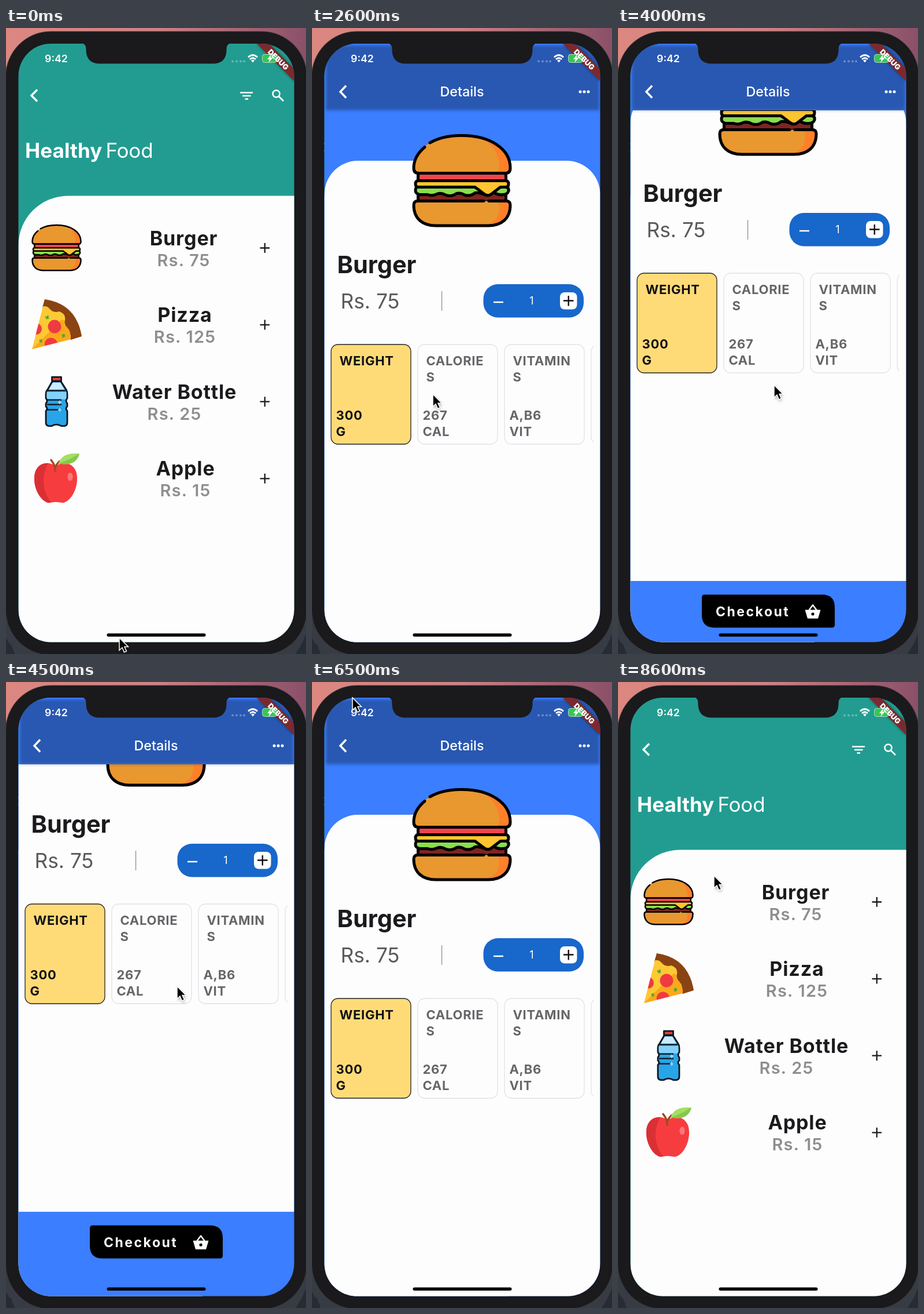
These frames come from a looping animation (519 px wide and 1080 px high, 8700 ms). An HTML page:

```html
<!DOCTYPE html>
<html lang="en">
<head>
<meta charset="utf-8">
<title>Food ordering app</title>
<style>
  html, body { margin: 0; width: 100%; height: 100%; overflow: hidden; background: #1a191c; }
  svg { display: block; width: 519px; height: 1080px; font-family: Inter, sans-serif; }
  .name { font-size: 34px; font-weight: 700; letter-spacing: .9px; fill: #1b1b1d; text-anchor: middle; }
  .price { font-size: 29px; font-weight: 600; letter-spacing: 1.2px; fill: #8e8e90; text-anchor: middle; }
  .card { font-size: 22px; font-weight: 700; letter-spacing: .7px; }
  .line { fill: none; stroke-linecap: round; stroke-linejoin: round; }
</style>
</head>
<body>
<svg viewBox="0 0 519 1080">
  <defs>
    <linearGradient id="sky"><stop offset="0" stop-color="#dc8780"/><stop offset=".5" stop-color="#cf8285"/><stop offset="1" stop-color="#8a5068"/></linearGradient>
    <clipPath id="screen"><rect x="21.500" y="27" width="477" height="1032.500" rx="56"/></clipPath>
    <clipPath id="body"><rect x="21" y="142" width="478" height="920"/></clipPath>
    <clipPath id="strip"><rect x="32" y="500" width="455" height="300"/></clipPath>
    <clipPath id="slice"><path d="M1 86 23 0Q78 8 87 64Z"/></clipPath>
    <clipPath id="fruit"><path id="fruitShape" d="M42 24C34 13 6 14 5 42C4 63 17 84 30 86Q42 83 54 86C68 84 80 62 79 42C78 14 50 13 42 24Z"/></clipPath>
    <filter id="soft" x="-10%" y="-20%" width="120%" height="140%"><feGaussianBlur stdDeviation="2.6"/></filter>

    <g id="burger">
      <g stroke="#000" stroke-width="5" stroke-linejoin="round" stroke-linecap="round">
        <path d="M3 59C3 26 38 3 86.500 3S170 26 170 59Q170 68 162 68H11Q3 68 3 59Z" fill="#e9972f" stroke="none"/>
        <path d="M119 7C150 15 170 32 170 59Q170 68 162 68H143Q151 66 151 55C150 34 140 18 119 7Z" fill="#ff8029" stroke="none"/>
        <path d="M31 15.500C46 7 65 3 86.500 3C135 3 170 26 170 59Q170 68 162 68H11Q3 68 3 59C3 45 10 33 22 23" fill="none"/>
        <rect x="10.500" y="68" width="152" height="13" fill="#f4434c"/>
        <rect x="10.500" y="100" width="152" height="17" fill="#7d2521"/>
        <path d="M10 92H163Q168 93 167 99Q165 105 157 105Q148 106 142 101Q135 106 126 105Q117 101 109 102Q102 108 92 106Q84 101 77 103Q69 109 59 106Q51 101 43 104Q35 108 27 105L13 105Q6 103 6 98Q6 92 10 92Z" fill="#8ade4c"/>
        <path d="M11 81H162Q167 81 167 86.500T162 92H153L136 105Q130 108 125 104L109 92H11Q6 92 6 86.500T11 81Z" fill="#ffc52e"/>
        <path d="M10 116H163Q170 116 170 123C170 147 154 158.500 132 158.500H41C19 158.500 3 147 3 123Q3 116 10 116Z" fill="#e9972f" stroke="none"/>
        <path d="M146 116H163Q170 116 170 123C170 147 154 158.500 132 158.500H118C139 157 151 146 151 127Q151 119 146 116Z" fill="#ff8029" stroke="none"/>
        <path d="M133 116H163Q170 116 170 123C170 147 154 158.500 132 158.500H41C19 158.500 3 147 3 123Q3 116 10 116H124" fill="none"/>
      </g>
    </g>

    <g id="pizza">
      <path d="M23 0Q78 8 87 64L68 70 19 14Z" fill="#8a4312"/>
      <path d="M1 86 20 12Q28 11 32 17Q38 24 48 21Q60 25 58 36Q56 43 62 49Q68 55 68 69Z" fill="#fdc935"/>
      <path d="M1 86 52 35Q58 35 57 41Q56 44 62 49Q68 55 68 69Z" fill="#fba81b"/>
      <g fill="#f03a42" clip-path="url(#slice)"><circle cx="40" cy="47" r="11.500"/><circle cx="8" cy="51" r="10"/><path d="M23 80.500A11 11 0 0 1 45 75Z"/></g>
      <path d="M24 30l6 3M29 28l-3 6M53 61l5 3M57 60l-3 6M14 70l4 4M18 69l-3 5" stroke="#4aa832" stroke-width="2.500"/>
    </g>

    <g id="bottle" stroke="#10151c" stroke-width="2.800" stroke-linejoin="round">
      <path d="M36 9H51L60 23Q62 26 62 31V38Q58 43 62 47V52Q58 56 62 60V80Q62 85 57 86H52Q43 81 35 86H30Q25 85 25 80V60Q29 56 25 52V47Q29 43 25 38V31Q25 26 28 23Z" fill="#28a4e8"/>
      <path d="M26.500 27H60.500V37L59 40H28L26.500 37Z" fill="#83d1fb" stroke="none"/>
      <path d="M28 25H59M27 41H52M27 49H52M27 58H52" stroke-width="2.300"/>
      <path d="M37 11H50L57 23H30Z" fill="#c9ecff" stroke="none"/>
      <path d="M46 45h6M49 42v6M46 58h6M49 55v6" stroke="#a5dcfb" stroke-width="2"/>
      <rect x="35.500" y="1.400" width="16" height="7" fill="#e83c35"/>
    </g>

    <g id="apple">
      <use href="#fruitShape" fill="#f73c3f"/>
      <path d="M0 10H34C16 34 16 66 38 90H0Z" fill="#da3035" clip-path="url(#fruit)"/>
      <path d="M41 31Q42 22 34 12M41 27Q42 20 49 14" class="line" stroke="#a34a20" stroke-width="3.500"/>
      <path d="M47 18Q53-2 83 1Q77 24 47 18Z" fill="#a4df61"/>
      <path d="M47 18Q63 13 83 1Q77 24 47 18Z" fill="#83c94b"/>
      <ellipse cx="67" cy="41" rx="4.500" ry="7" fill="#fa777b"/>
    </g>
  </defs>

  <rect width="519" height="1080" fill="url(#sky)"/>
  <rect y="900" width="519" height="180" fill="#363b44"/>
  <path d="M0 1052l5 9 4 3 6 16H0ZM519 1046l-8 18-10 16h18Z" fill="#272b33"/>
  <rect x="-.5" y="6" width="521" height="1076" rx="78" fill="#1a191c" stroke="#3b393d"/>

  <g clip-path="url(#screen)">
    <g id="list">
      <rect x="21" y="27" width="478" height="1034" fill="#229c91"/>
      <path d="M21.500 375A86 85.500 0 0 1 107.500 289.500H499V1061H21.500Z" fill="#fefdfe"/>
      <path d="M54 106.500 44 116.500 54 126.500" fill="none" stroke="#fff" stroke-width="3.500"/>
      <path d="M405 111.500H427M409 117H423.500M413.500 122.500H419" stroke="#fff" stroke-width="2.400"/>
      <g fill="none" stroke="#fff" stroke-width="2.500"><circle cx="467.500" cy="113.500" r="6"/><path d="M472 118 480 126"/></g>
      <g fill="#fff" font-size="35"><text x="33" y="224" font-weight="700" letter-spacing=".1">Healthy</text><text x="172.500" y="224" font-weight="400" letter-spacing="-.2">Food</text></g>
      <g id="rows"></g>
    </g>

    <g id="detail">
      <rect x="21" y="27" width="478" height="1034" fill="#3b7eff"/>
      <g clip-path="url(#body)"><g id="page">
        <path d="M21.500 287A58 58 0 0 1 79.500 229H440.500A58 58 0 0 1 498.500 287V1077H21.500Z" fill="#fefdfe"/>
        <use id="dish" href="#burger" x="173" y="182.500"/>
        <text x="43.500" y="422.500" font-size="41.500" font-weight="700" fill="#1b1b1d">Burger</text>
        <text x="49.500" y="483.500" font-size="35.300" fill="#5a5a5c">Rs. 75</text>
        <path d="M224.500 454V488" stroke="#9a9a9c" stroke-width="1.500"/>
        <rect x="296.500" y="442" width="173.500" height="57.500" rx="25" fill="#1867cb"/>
        <path d="M314 473H331" stroke="#fff" stroke-width="2.500"/>
        <text x="380" y="477" font-size="18" fill="#fff" text-anchor="middle">1</text>
        <rect x="429" y="456" width="29.500" height="29.500" rx="8" fill="#fff"/>
        <path d="M435 470.500H452.500M443.750 462V479.500" stroke="#111" stroke-width="2.400"/>
        <g id="cards" clip-path="url(#strip)"></g>
        <path d="M150 1100.500H353Q375 1100.500 375 1122.500V1152.500Q375 1157.500 370 1157.500H167Q145 1157.500 145 1135.500V1105.500Q145 1100.500 150 1100.500Z"/>
        <text x="169" y="1137.500" font-size="23" font-weight="700" letter-spacing="2.500" fill="#fff">Checkout</text>
        <path d="M324.500 1127.500H349.500L345.500 1141H328.500Z" fill="#fff" stroke="#fff" stroke-width="1.500" stroke-linejoin="round"/>
        <path d="M331 1126.500 337 1118.500 343 1126.500" class="line" stroke="#fff" stroke-width="2.400"/>
        <circle cx="337" cy="1134" r="2.600"/>
      </g></g>
      <rect x="24" y="30" width="473" height="112" opacity=".3" filter="url(#soft)"/>
      <path d="M59 99.500 49 110 59 120.500" fill="none" stroke="#fff" stroke-width="3.500"/>
      <text x="259.500" y="118" font-size="23.300" font-weight="500" fill="#fff" text-anchor="middle">Details</text>
      <g fill="#fff"><circle cx="464" cy="110" r="2.500"/><circle cx="471" cy="110" r="2.500"/><circle cx="478" cy="110" r="2.500"/></g>
    </g>

    <use id="hero" href="#burger"/>

    <path d="M434 27H455L499 71V92Z" opacity=".45" filter="url(#soft)"/>
    <path d="M434 27H455L499 71V92Z" fill="#7a2a2e"/>
    <g id="signal" fill="#fff" opacity=".3"></g>
    <path d="M419 50.500Q427 43 435 50.500M422 54Q427 49.500 432 54" fill="none" stroke="#fff" stroke-width="2.800"/>
    <path d="M424 56Q427 53.500 430 56L427 59.500Z" fill="#fff"/>
    <rect x="443.500" y="45.500" width="25" height="14" rx="4" fill="#35c84f" stroke="#b8d6ce"/>
    <path d="M459 45 452 54H456L454 60 462 51H457.500Z" fill="#fff"/>
    <text transform="translate(471 54.500) rotate(45)" y="4.500" font-size="12.800" font-weight="900" fill="#fff" text-anchor="middle">DEBUG</text>
    <text x="87" y="59" font-size="17.700" font-weight="600" fill="#fff" text-anchor="middle">9:42</text>
    <path d="M130 26Q138.500 27 138.500 36V38Q139 61.500 162 61.500H358Q381 61.500 381.500 38V36Q381.500 27 390 26Z" fill="#1a191c"/>
    <rect x="174.500" y="1044.500" width="171" height="5.500" rx="2.750"/>
  </g>

  <g id="cursor">
    <path d="M0 0V21.500L5 17 8.500 25 12.500 23.200 9 15.500H15.500Z" transform="translate(1 3)" opacity=".35" filter="url(#soft)"/>
    <path d="M0 0V21.500L5 17 8.500 25 12.500 23.200 9 15.500H15.500Z" stroke="#fff" stroke-width="1.500"/>
  </g>
</svg>
<script>
const $ = id => document.getElementById(id);
const LOOP = 8700, STEP = 100, WIDTH = 477;

const foods = [
  ['burger', 'Burger', 75, 307.5],
  ['pizza', 'Pizza', 125, 309.5],
  ['bottle', 'Water Bottle', 25, 291.5],
  ['apple', 'Apple', 15, 310.5]
];
$('rows').innerHTML = foods.map(([icon, name, price, x], i) => {
  const art = i ? `<use href="#${icon}" x="44" y="335.5"/>`
    : '<use id="thumb" href="#burger" transform="translate(44 338.5) scale(.503)"/>';
  return `<g transform="translate(0 ${i * 132.6})">${art}
    <text class="name" x="${x}" y="374.5">${name}</text>
    <text class="price" x="${x}" y="410.500">Rs. ${price}</text>
    <path d="M439.500 379.500H456M447.750 371V388" stroke="#1b1b1d" stroke-width="2.300"/></g>`;
}).join('');

const facts = [['WEIGHT', '', '300', 'G'], ['CALORIE', 'S', '267', 'CAL'], ['VITAMIN', 'S', 'A,B6', 'VIT'], ['', '', '', '']];
$('cards').innerHTML = facts.map(([a, b, c, d], i) => {
  const text = (x, y, s) => `<text class="card" x="${x}" y="${y}">${s}</text>`;
  return `<g transform="translate(${33 + i * 150} 546)" fill="${i ? '#666668' : '#111'}">
    <rect width="138" height="172" rx="12" fill="${i ? '#fefdfe' : '#ffdb78'}" stroke="${i ? '#e2e1e7' : '#222'}" stroke-width="1.300"/>
    ${text(14.5, 36, a)}${text(14.5, 64, b)}${text(8.5, 130, c)}${text(8.5, 158, d)}</g>`;
}).join('');

$('signal').innerHTML = [392, 399, 406, 412].map(x => `<circle cx="${x}" cy="57.500" r="2"/>`).join('');

const clamp = v => Math.max(0, Math.min(1, v));
const smooth = v => v * v * (3 - 2 * v);
const easeOut = v => 1 - (1 - v) ** 3;
const mix = (a, b, v) => a + (b - a) * v;

// keys are [time, ...values]
function track(keys, t) {
  const i = keys.findIndex(k => k[0] > t);
  if (i < 0) return keys[keys.length - 1].slice(1);
  if (!i) return keys[0].slice(1);
  const a = keys[i - 1], b = keys[i], v = smooth((t - a[0]) / (b[0] - a[0]));
  return a.slice(1).map((n, j) => mix(n, b[j + 1], v));
}

const pointer = [
  [0, 196, 1052], [300, 190, 1020], [1400, 86, 387], [2100, 86, 387], [2900, 266, 745],
  [3600, 269, 616], [4000, 270, 616], [4500, 296, 525], [4800, 286, 590], [5500, 266, 868],
  [5700, 265, 881], [6500, 70, 27], [7000, 54, 110], [7600, 54, 110], [8600, 166, 334]
];
const scroll = [
  [2900, 0], [3500, -123], [4000, -123], [4500, -163], [4800, -110],
  [5250, 0], [5500, 40], [5700, 29], [6400, 0]
];

function draw(t) {
  const opening = t < 5000;
  const raw = clamp((t - (opening ? 1850 : 7350)) / 500);
  const p = opening ? easeOut(raw) : 1 - easeOut(raw);
  const h = opening ? smooth(raw) : 1 - smooth(raw);
  const flying = raw > 0 && raw < 1;
  const move = (id, x, y) => $(id).setAttribute('transform', `translate(${x} ${y})`);
  const show = (id, on) => $(id).setAttribute('visibility', on ? 'visible' : 'hidden');

  move('list', -p * WIDTH / 3, 0);
  move('detail', (1 - p) * WIDTH, 0);
  move('page', 0, track(scroll, t)[0]);
  move('cursor', ...track(pointer, t));
  show('detail', p > 0);
  show('thumb', !flying);
  show('dish', !flying && p > 0);
  show('hero', flying);
  $('hero').setAttribute('transform',
    `translate(${mix(44, 173, h)} ${mix(338.5, 182.5, h)}) scale(${mix(.503, 1, h)})`);
}

function frame(now) {
  draw(Math.floor(now % LOOP / STEP) * STEP);
  requestAnimationFrame(frame);
}
draw(0);
requestAnimationFrame(frame);
</script>
</body>
</html>
```
